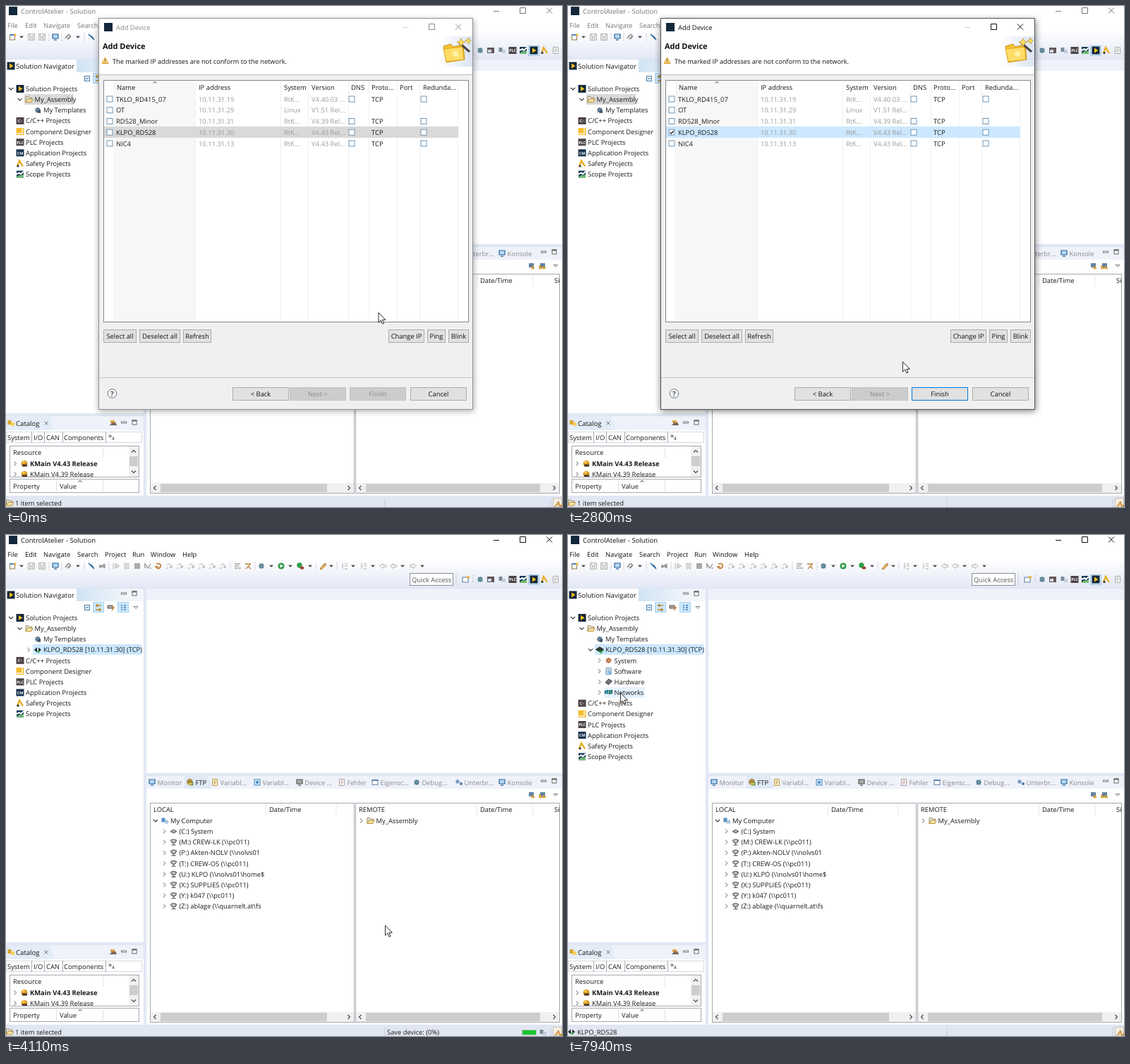
These frames come from a looping animation (788 px wide and 711 px high, 8 s). An HTML page:

```html
<!DOCTYPE html>
<html lang="en">
<head>
<meta charset="utf-8">
<title>Add device</title>
<style>
html, body { margin: 0; width: 100%; height: 100%; overflow: hidden; background: #fff; }
svg { display: block; width: 788px; height: 711px; }
text { font-family: "Open Sans", "Noto Sans", sans-serif; white-space: pre; text-rendering: geometricPrecision; }
</style>
</head>
<body>
<svg viewBox="0 0 788 711">
  <defs>
    <linearGradient id="bar" x2="0" y2="1"><stop stop-color="#fff"/><stop offset="1" stop-color="#e3e8f5"/></linearGradient>
    <linearGradient id="tab"><stop stop-color="#cfe4f3"/><stop offset=".75" stop-color="#f2f5fb"/></linearGradient>
    <linearGradient id="banner"><stop stop-color="#fff"/><stop offset="1" stop-color="#dbe4f3"/></linearGradient>
    <filter id="blur" x="-10%" y="-10%" width="120%" height="120%"><feGaussianBlur stdDeviation="5"/></filter>
  </defs>
  <g id="scene"></g>
  <path id="cursor" d="M0 0V14.2l3.2-3.1 2.3 5 2.1-.9-2.2-4.8h4.5z" fill="#fff" stroke="#111" stroke-width=".9"/>
</svg>
<script>
const LOOP = 8000;
const DEVICE = 'KLPO_RD528', PROJECT = 'My_Assembly', APP = 'ControlAtelier';
const GREY = '#9a9a9a', SELECTED = '#cce8ff', PANEL_EDGE = '#dce3f1', BOX_EDGE = '#a3a8b2';

const rect = (x, y, w, h, fill, stroke) => stroke
  ? `<rect x="${x + .5}" y="${y + .5}" width="${w - 1}" height="${h - 1}" fill="${fill}" stroke="${stroke}"/>`
  : `<rect x="${x}" y="${y}" width="${w}" height="${h}" fill="${fill}"/>`;
const text = (x, y, label, fill = '#1a1a1a', size = 9.4, extra = '') =>
  `<text x="${x}" y="${y}" fill="${fill}" font-size="${size}" ${extra}>${label}</text>`;
const path = (d, stroke, fill = 'none', width = 1) =>
  `<path d="${d}" stroke="${stroke}" fill="${fill}" stroke-width="${width}"/>`;
const disc = (x, y, r, fill, stroke = 'none') => `<circle cx="${x}" cy="${y}" r="${r}" fill="${fill}" stroke="${stroke}"/>`;
const place = (x, y, content, turn = 0) => `<g transform="translate(${x} ${y}) rotate(${turn})">${content}</g>`;
const chevron = (x, y, turn, color = '#555', s = 1) =>
  place(x, y, path(`M${-1.5 * s} ${-3 * s}L${1.5 * s} 0L${-1.5 * s} ${3 * s}`, color, 'none', 1.1), turn);

// Icons are centred on the origin and about ten pixels wide.
const tag = (fill, label) => rect(-5.5, -5, 11, 10, fill) +
  text(0, 2.3, label, '#fff', 5.4, 'text-anchor="middle" font-weight="bold"');
const screen = (fill, stroke) => path('M-4-4H4V2H-4zM-2 4.2H2', stroke, fill, 1.2);
const doc = (color, fill = '#fff') => path('M-3.5-4.5H3.5V4.5H-3.5z', color, fill) + path('M-2-2H2M-2 0H2M-2 2H1', color);
const arrow = color => path('M-4.5 0 0-3.5V-1.3H4.5V1.3H0V3.5z', color, '#fff', .9);
const folder = path('M-4.5 4V-4H-1L0-2.5H4V0', '#a98a4a', '#dbeafa') + path('M-4.5 4-2.5-.5H5.5L3.5 4z', '#b28f3c', '#fbe3a0');
const gear = (color, fill) => path('M-4 0H4M0-4V4M-3-3 3 3M3-3-3 3', color, 'none', 1.2) + disc(0, 0, 2.2, fill, color);
const cylinder = color => path('M-4-2.5Q0-5 4-2.5Q3 1 0 1Q-3 1-4-2.5M0 1V4M-3 4H3', color, '#ccc', 1.3);
const pair = (a, b) => rect(-4.5, -4, 5, 6, a) + rect(0, -1, 5, 5, b);
const icons = {
  folder, cylinder: cylinder('#666'), drive: path('M-4.5 0 0-2.5 4.5 0 0 2.5z', '#555', '#aaa'),
  play: rect(-5.5, -5.5, 11, 11, '#14283c') + path('M-2-3.5 3.5 0-2 3.5z', 'none', '#f5c01c'),
  cpp: tag('#4d4348', 'C··'), plc: tag('#4a4347', 'PLC'), cm: tag('#18324b', 'CM'),
  component: rect(-5.5, -5, 11, 10, '#f4bd2c') + path('M-5 3H3V-4', '#fff', 'none', 1.3),
  safety: path('M-4 4-1-4 4 4', '#e8aa18', 'none', 2.2) + disc(-3, 3.5, 1.6, '#333'),
  scope: rect(-5, -5, 10, 10, '#173a55') + path('M-5 0-1-2 1 0 5-4', '#fff', 'none', 2) + path('M-5 4-1 1 1 2 5 0V5H-5z', 'none', '#72bd72'),
  template: gear('#33495c', '#6ba4d8') + rect(0, 0, 4, 4, '#456'),
  link: path('M-5 0-1-3.5V3.5z', 'none', '#222') + path('M1-3.5 5 0 1 3.5z', 'none', '#333') + rect(-.5, 1, 3, 3, '#38a852'),
  online: path('M-5.5-.5 0-4 5.5-.5 0 3z', '#222', '#343d39') + path('M-1 2 1.5 4.5 5.5 0', '#35b34a', 'none', 1.7),
  system: gear('#a64b26', '#e2a35b'), software: doc('#5b87ad') + disc(2, 2, 2.2, '#7eb4df'),
  hardware: path('M-4.5 1 0-4 5-1 0 4z', '#444', '#74747c'),
  network: path('M-5 2V-2L-1-3V2M1 2V-3H5V1z', '#26735b', '#3e99c5', 1.3),
  computer: pair('#5a8fc5', '#aac7e3'), release: disc(0, 0, 4.5, '#d79920') + rect(-3, 1, 7, 3, '#4a3b36') + disc(-1, -2, 1.8, '#f8d257'),
  catalog: pair('#d8a42c', '#f8cf60'),
  new: rect(-4, -3.5, 8, 8, '#fff', '#8a7445') + rect(-4, -4, 8, 2, '#5b83b7') + disc(4, -3, 1.7, '#f3bc2e'),
  disk: path('M-4.5-4.5H4.5V4.5H-4.5zM-2.5-4V-1H2.5V-4M-2 4.5V1H2V4.5', '#b6b6b6', '#eee'),
  caret: path('M-3-1.3H3L0 1.8z', 'none', '#444'), triangle: path('M-3-1.5H3L0 1.5z', '#666', '#fff', .8),
  monitor: screen('#b8d9f5', '#29639c'), greyscreen: screen('#aaa', '#555'),
  chain: path('M-4 2 0-3Q3-4 3-1L-1 3M0 3 4-1', '#888', 'none', 1.5),
  probe: path('M-4-4 4 4M-1-2 3 2', '#326ba2', 'none', 1.7), step: path('M4-3-1 0 4 3zM-4-1H-1V2H-4', '#888', '#aaa'),
  resume: path('M-4-4V4M-1-3.5 4.5 0-1 3.5z', '#b2b2b2', '#ddd'), pause: path('M-3-4H-1V4H-3zM1-4H3V4H1z', '#bbb'),
  stop: rect(-4, -4, 8, 8, '#aaa'), hook: path('M-4 3H-1M-3-1Q0-5 3-1V2M1 0 3 3 5 0', '#aaa'),
  zig: path('M-4 3V-3L0 3 4-3M2 3H5', '#888', 'none', 1.2), restart: path('M-3-3Q4-5 3 1Q0 6-4 1H0', '#c2772b', 'none', 1.7),
  list: path('M-4-3H4M-4 0H2M-4 3H0M1 3H5', '#777', 'none', 1.2), wave: path('M-4-3H4M-3 4 3-2M0 0 4 4', '#b9853d', 'none', 1.4),
  bug: gear('#376476', '#75a7b6'), run: disc(0, 0, 4.6, '#309c48') + path('M-1.5-2.5 3 0-1.5 2.5z', 'none', '#fff'),
  ext: disc(-1, -1, 3.7, '#309c48') + rect(0, 1, 5, 3.5, '#a23e32'), torch: path('M-4 4 1-2 3 0-2 5zM1-2 4-4 4 0', '#ae7132', '#f1c064'),
  mark: path('M-3-4V4M0-3H4M0 0H4M0 3 2 5 4 3', '#aaa'), back: arrow('#aaa'), next: place(0, 0, arrow('#aaa'), 180),
  open: rect(-4.5, -3.5, 9, 8, '#fff', '#5a789b') + disc(4, -3, 2, '#e8b437'), cmd: rect(-5, -4, 10, 8, '#665557') + rect(-4, -1, 5, 4, '#cbdcf0'),
  sheets: pair('#7b8c98', '#c2cfda'), scroll: doc('#a8a8a8'),
  collapse: rect(-4, -4, 8, 8, '#e9f2fa', '#4980aa') + path('M-2 0H2', '#356c99'),
  sync: path('M4-3H-3L-1-5M-3-3-1-1M-4 3H3L1 1M3 3 1 5', '#ba8528', 'none', 1.5),
  flags: path('M-5-3H2V1H-5z', '#555', '#aaa') + path('M1-2 4 0 1 4', '#d48632', 'none', 1.5),
  tree: path('M-3-3H-1M1-3H4M-3 0H-1M1 0H4M-3 3H-1M1 3H4', '#3879b0', 'none', 1.3),
  min: rect(-4, -1.5, 8, 3, '#fff', '#777'), max: rect(-3.5, -3.5, 7, 7, '#fff', '#666') + rect(-3.5, -3.5, 7, 2, '#666'),
  ftp: disc(-.5, -.5, 4.4, '#b48938') + path('M-4 0H4V4H0', '#3f8354', '#e9be4c'),
  variable: doc('#b99745', '#fff6dc'), cyan: rect(-4.5, -4.5, 9, 9, '#d7eafb', '#4185b8') + disc(0, 0, 2, '#4185b8'),
  fault: doc('#b79a9a'), props: rect(-4.5, -4, 9, 8, '#fff', '#6481ad') + rect(-4.5, -4, 9, 2, '#6481ad'),
  breaks: disc(-2, -1, 2.2, '#8bacd0', '#5a7ba7') + disc(3, 2, 2, '#4c78aa'),
  plug: rect(-4, -4, 7, 6, '#6284a5') + path('M0 0 4 3 0 4z', '#c18922', '#f4c23e'),
  plugs: rect(-3, -4, 7, 6, '#6284a5') + path('M-4-1 0 3-4 4zM1 0 5 3 1 4z', '#c18922', '#f4c23e'),
  books: rect(-4, -3, 6, 3, '#e0a344') + rect(-3, 0, 7, 3, '#8c6a55') + rect(-5, 3, 10, 1, '#555'),
  building: path('M-5 4 0-3 2 4H5V1', '#b37531', '#eeb45f'),
};
const icon = (name, x, y) => place(x, y, icons[name]);
const toolbar = (y, spec) => spec.split(',').map(s => s.split(' ')).map(([n, x]) => icon(n, x, y)).join('');
const dots = (x, y, h) => path(`M${x} ${y}v${h}`, '#969bad').replace('/>', ' stroke-dasharray="1 2"/>');

const rowY = (i, top = 117.5) => top + i * 15.15;
function treeRow(left, y, depth, open, name, label, extra = '') {
  const x = left + 12.5 * depth;
  const fold = open === null ? '' : chevron(x + 7, y, open ? 90 : 0, open ? '#333' : '#999');
  return fold + icon(name, x + 20, y) + text(x + 28, y + 3.5, label, undefined, 9.4, extra);
}

function windowButtons(x, y, minColor, color) {
  const r = 4, gap = 37.5;
  return path(`M${x - r} ${y + 1}h${2 * r}`, minColor) + path(`M${x + gap - r} ${y - r}h${2 * r}v${2 * r}h${-2 * r}z`, color) +
    path(`M${x + 2 * gap - r} ${y - r}l${2 * r} ${2 * r}m0 ${-2 * r}l${-2 * r} ${2 * r}`, color);
}

const drives = String.raw`(C:) System
(M:) CREW-LK (\\pc011)
(P:) Akten-NOLV (\\nolvs01
(T:) CREW-OS (\\pc011)
(U:) KLPO (\\nolvs01\home$
(X:) SUPPLIES (\\pc011)
(Y:) k047 (\\pc011)
(Z:) ablage (\\quarnelt.at\fs`.split('\n');

function fileBox(x, title, dateX, thumbEnd) {
  const right = x + 290;
  return rect(x, 380, 290, 312, '#fff', BOX_EDGE) + text(x + 5, 393, title) + text(dateX, 393, 'Date/Time') +
    path(`M${dateX - 4.5} 382v16M${dateX + 95 - (x > 400 ? 20 : 0)} 382v16`, '#e8e8e8') +
    rect(x + 1, 677, 288, 14, '#f0f0f0') + rect(x + 15, 678, thumbEnd - x - 15, 12, '#cdcdcd') +
    chevron(x + 7, 684, 180, '#444') + chevron(right - 8, 684, 0, '#444');
}

const frame = rect(0, 0, 788, 711, '#e4e9f6') + rect(0, 0, 788, 36, '#fff') + rect(0, 35, 788, 40, 'url(#bar)') +
  rect(4, 1, 12, 12, '#14283c') +
  toolbar(44, 'new 9,caret 22,disk 36,disk 51,monitor 70,chain 88,caret 102,probe 121,step 136,resume 156,pause 171,stop 186,zig 201,restart 216,hook 231,hook 246,hook 262,hook 277,hook 292,hook 307,list 328,wave 343,bug 362,caret 376,run 390,caret 403,ext 417,caret 431,torch 449,caret 461,mark 480,caret 492,mark 507,caret 520,back 534,back 549,caret 562,next 577,caret 590') +
  [61, 79, 111, 146, 318, 353, 439, 469].map(x => dots(x, 39, 10)).join('') +
  rect(572, 54, 62, 18, '#fff', '#8c909a') + text(575, 66.5, 'Quick Access', '#555') + dots(638, 55, 16) + dots(662, 57, 12) +
  rect(740, 56, 16, 15, '#cce4f7', '#a8cce8') +
  toolbar(63, 'open 651,bug 672,cmd 687,sheets 703,plc 718,scope 733,play 748,safety 763,scroll 779') +
  // Left panels
  rect(-1, 75, 197, 504, '#fff', PANEL_EDGE) + rect(100, 76, 95, 18, 'url(#tab)') +
  icon('play', 7, 85) + text(14, 88.7, 'Solution Navigator', undefined, 9.6) + toolbar(83, 'min 167,max 182,min 762,max 777') +
  rect(123, 95, 16, 15, SELECTED, '#a7d2ef') + rect(158, 95, 16, 15, SELECTED, '#a7d2ef') +
  toolbar(103, 'collapse 115,sync 131,flags 149,tree 166,triangle 184') +
  rect(-1, 581, 197, 115, '#fff', PANEL_EDGE) + rect(0, 582, 195, 20, '#eff2fa') +
  path('M0 602V582H60Q65 582 67 602z', 'none', '#e3ecf7') + icon('catalog', 7, 592) + text(14, 596.3, 'Catalog', undefined, 9.6) +
  path('M54.5 589.5l5 5m0-5l-5 5', '#777') + toolbar(591, 'books 152,min 167,max 182') +
  rect(0, 604, 193, 16, '#fff', '#d5d8df') + path('M36.5 604v16M54.5 604v16M80.5 604v16M141.5 604v16', '#a6abb5') +
  text(2, 615.5, 'System') + text(39, 615.5, 'I/O') + text(57, 615.5, 'CAN') + text(82, 615.5, 'Components') +
  text(145, 613, '»', undefined, 10) + text(150, 616, '4', undefined, 6.5) +
  rect(5, 624, 184, 45, '#fff', BOX_EDGE) + text(10, 637, 'Resource') + path('M137.5 626v15', '#e5e5e5') +
  treeRow(6, 649.5, 0, false, 'release', 'KMain V4.43 Release', 'font-weight="bold"') +
  treeRow(6, 664.5, 0, false, 'release', 'KMain V4.39 Release') +
  rect(0, 668, 194, 4, '#fff') + path('M5 668.5h184', BOX_EDGE) +
  rect(174, 625, 14, 43, '#f0f0f0') + rect(175, 639, 12, 14, '#cdcdcd') + chevron(181, 632, 270, '#444') + chevron(181, 661, 90, '#444') +
  rect(5, 671, 184, 20, '#fff', BOX_EDGE) + text(10, 685, 'Property') + text(76, 685, 'Value') +
  path('M71.5 673v16M137.5 673v16', '#e0e0e0') + chevron(105, 674.5, 270, '#777', .8) +
  // Editor and file panels
  rect(198, 75, 591, 264, '#fff', PANEL_EDGE) + rect(199, 76, 589, 16, '#eff2fa') +
  rect(198, 341, 591, 355, '#fff', PANEL_EDGE) + rect(199, 342, 589, 18, '#eff2fa') +
  path('M253 360V345Q253 341 257 341H284Q289 342 291 360z', 'none', '#e0eaf6') +
  [['monitor', 207, 'Monitor'], ['ftp', 261, 'FTP'], ['variable', 296, 'Variabl...'], ['cyan', 356, 'Variabl...'], ['greyscreen', 416, 'Device ...'],
    ['fault', 476, 'Fehler'], ['props', 523, 'Eigensc...'], ['bug', 582, 'Debug...'], ['breaks', 642, 'Unterbr...'], ['monitor', 703, 'Konsole']]
    .map(([n, x, s]) => icon(n, x, 351) + text(x + 7.5, 354.7, s, s === 'FTP' ? '#111' : '#8b8b8b')).join('') +
  toolbar(349, 'min 762,max 777') + toolbar(369, 'plug 745,plugs 760,triangle 779') +
  fileBox(204, 'LOCAL', 373, 455) + fileBox(495, 'REMOTE', 672, 757) + text(777, 393, 'Si') +
  treeRow(205, 405.5, 0, true, 'computer', 'My Computer') +
  drives.map((s, i) => treeRow(205, rowY(i + 1, 405.5), 1, false, i ? 'cylinder' : 'drive', s)).join('') +
  treeRow(496.5, 405.5, 0, false, 'folder', PROJECT) +
  // Status bar
  rect(0, 697, 788, 14, '#e1e6f3') + dots(537, 700, 11) + dots(772, 700, 11) + rect(775, 698, 13, 13, '#f5efe1', '#c7c3b5') + icon('building', 783, 706);

function navigator(s) {
  const devices = s.saved ? [[2, s.expanded, s.online ? 'online' : 'link', DEVICE + ' [10.11.31.30] (TCP)']] : [];
  const parts = s.expanded ? [['system', 'System'], ['software', 'Software'], ['hardware', 'Hardware'], ['network', 'Networks']] : [];
  const rows = [[0, true, 'play', 'Solution Projects'], [1, true, 'folder', PROJECT], [2, null, 'template', 'My Templates'],
    ...devices, ...parts.map(([n, label]) => [3, false, n, label]),
    ...[['cpp', 'C/C++ Projects'], ['component', 'Component Designer'], ['plc', 'PLC Projects'], ['cm', 'Application Projects'],
      ['safety', 'Safety Projects'], ['scope', 'Scope Projects']].map(([n, label]) => [0, null, n, label])];
  return (s.saved ? rect(38, 155, 154, 15, SELECTED) : rect(26, 125, 70, 15, '#d9d9d9')) +
    rows.map(([depth, open, n, label], i) =>
      (s.part === i && depth === 3 ? rect(51, rowY(i) - 7.5, 18 + label.length * 5, 15, '#e5f3ff') : '') +
      treeRow(0, rowY(i), depth, open, n, label)).join('');
}

function button(x, y, w, label, mode = 'normal', h = 19) {
  const [fill, edge, ink] = { normal: ['#e1e1e1', '#adadad', '#111'], off: ['#ccc', '#bfbfbf', '#8a8a8a'],
    primary: ['#e1e1e1', '#0078d7', '#111'], hover: ['#e5f1fb', '#0078d7', '#111'] }[mode];
  return rect(x, y, w, h, fill, edge) + text(x + w / 2, y + h / 2 + 3.6, label, ink, 9.4, 'text-anchor="middle"');
}
const checkbox = (x, y, on) => rect(x - 4.5, y - 4.5, 9, 9, '#fff', '#6f95b5') +
  (on ? path(`M${x - 2.5} ${y}l2 2 3.3-4`, '#222', 'none', 1.2) : '');

const columns = [157, 273, 394, 433, 489, 518, 558, 591];
const headings = ['Name', 'IP address', 'System', 'Version', 'DNS', 'Proto...', 'Port', 'Redunda...'];
const found = [['TKLO_RD415_07', 19, 'RtK...', 'V4.40.03 ...'], ['OT', 29, 'Linux', 'V1.51 Rel...'], ['RD528_Minor', 31, 'RtK...', 'V4.39 Rel...'],
  [DEVICE, 30, 'RtK...', 'V4.43 Rel...'], ['NIC4', 13, 'RtK...', 'V4.43 Rel...']];

function dialog(s) {
  const ink = s.active ? '#111' : '#8a8a8a';
  const rows = found.map(([name, host, system, version], i) => {
    const y = 132 + i * 15.75;
    return checkbox(147, y, i === 3 && s.checked) + text(156, y + 3.5, name) +
      ['10.11.31.' + host, system, version].map((v, c) => text(columns[c + 1], y + 3.5, v, GREY)).join('') +
      (i === 1 ? '' : checkbox(490, y) + text(518, y + 3.5, 'TCP') + checkbox(592, y));
  }).join('');
  const finish = s.closing || !s.checked ? 'off' : s.finishHover ? 'hover' : 'primary';
  const plain = s.closing ? 'off' : 'normal';
  return `<rect x="131" y="20" width="532" height="555" opacity="${s.active ? .5 : .32}" filter="url(#blur)"/>` +
    rect(131, 17, 531, 556, '#f0f0f0', s.active ? '#555' : '#8f8f8f') + rect(132, 18, 529, 79, '#fff') + path('M132 97.5H661', '#bdbdbd') +
    rect(139, 24, 12, 12, '#14283c') + text(156, 33.5, 'Add Device', ink) + windowButtons(566, 29.5, '#ccc', ink) +
    text(137, 61.3, 'Add Device', '#111', 11, 'font-weight="bold"') +
    path('M140.5 73 145 81.5H136z', '#d99a25', '#ffd67a') + path('M140.5 75.5v3m0 1v1', '#553') +
    text(151, 81.6, 'The marked IP addresses are not conform to the network.', '#111', 9.2) +
    rect(614, 43, 47, 43, 'url(#banner)') + path('M620 57 631 54 633 58 648 55 650 76 624 80z', '#c99012', '#f5c330') +
    path('M620 61 647 58 649 76 624 79z', '#e0a91c', '#ffdc68') + disc(637, 68, 4, '#fff2a8') + path('M642 52 657 65', '#4b4543', 'none', 3) +
    path('M639 51l4-1 2-4 2 4 4 1-4 2-1 4-3-3zM651 49l3-1 1-3 2 3 2 1-2 2-1 3-2-3z', '#bb8a23', '#ffdf62', .7) +
    // Device table
    rect(138, 105, 518, 344, '#fff', '#828790') + rect(152, 106, 116, 342, '#f7f7f7') +
    path([268, 389, 428, 485, 514, 554, 586, 640].map(x => `M${x + .5} 107V448`).join(''), '#f0f0f0') + chevron(211, 108.5, 270, '#888', .8) +
    headings.map((h, i) => text(columns[i], 118.8, h)).join('') +
    (s.rowHover ? rect(139, 171, 502, 16, SELECTED, '#99d1ff') : rect(139, 171, 502, 16, s.active ? SELECTED : '#d9d9d9')) + rows +
    [[138, 47, 'Select all'], [189, 58, 'Deselect all'], [251, 40, 'Refresh'], [542, 51, 'Change IP'], [597, 26, 'Ping'], [627, 29, 'Blink']]
      .map(([x, w, label]) => button(x, 459, w, label, plain)).join('') +
    path('M132 527.5H661', '#c8c8c8') + disc(150.5, 550, 6.3, '#f5f5f5', '#6d7684') +
    text(150.5, 553.7, '?', '#4d5968', 10, 'text-anchor="middle" font-weight="bold"') +
    button(321, 541, 80, '&lt; Back', plain) + button(402, 541, 80, 'Next >', 'off') + button(487, 541, 80, 'Finish', finish) + button(573, 541, 80, 'Cancel', plain);
}

function draw(s) {
  const titleInk = s.open ? '#777' : '#111', menuInk = s.closing ? '#111' : '#777';
  const menus = [[2, 'File'], [27, 'Edit'], [53, 'Navigate'], [101, 'Search'], [140, 'Project'], [179, 'Run'], [205, 'Window'], [250, 'Help']];
  return frame + text(21, 10.5, APP + ' - Solution', titleInk, 9.5) + windowButtons(695, 6.5, titleInk, titleInk) +
    menus.map(([x, label]) => text(x, 31.3, label, menuInk)).join('') + navigator(s) +
    icon(s.named ? 'link' : 'folder', 5, 705) + text(13, 708.5, s.named ? DEVICE : '1 item selected') +
    (s.saving ? text(540, 709, 'Save device: (0%)') + rect(731, 702, 21, 8, '#17c52f', '#b5c2b5') + icon('sheets', 761, 706) : '') +
    (s.open ? dialog(s) : '');
}

// Pointer path: time, x, y
const stops = [[0, 528, 435], [80, 528, 435], [230, 534, 456], [780, 190, 179], [940, 190, 179], [1490, 168, 180], [1640, 168, 180],
  [1870, 146, 181], [2100, 145, 181], [2250, 141, 179], [2450, 145, 181], [2870, 500, 530], [2950, 500, 530], [3250, 541, 560],
  [3570, 537.5, 554], [4180, 537.5, 554], [4880, 217, 197], [4980, 217, 197], [5140, 47.5, 170], [5600, 30, 162], [5830, 29.5, 161.5],
  [6700, 29.5, 161.5], [7160, 88, 171], [7560, 88, 171], [7800, 72, 221], [7940, 74.5, 224], [LOOP, 74.5, 224]];
function pointer(t) {
  const i = stops.findIndex(p => p[0] > t), [t0, x0, y0] = stops[i - 1], [t1, x1, y1] = stops[i];
  const k = (t - t0) / (t1 - t0), e = k * k * (3 - 2 * k);
  return [x0 + (x1 - x0) * e, y0 + (y1 - y0) * e];
}

const scene = document.getElementById('scene'), cursor = document.getElementById('cursor');
let shown = '';
function tick() {
  const t = performance.now() % LOOP, [x, y] = pointer(t);
  const inside = (l, top, r, b) => x >= l && x < r && y >= top && y < b;
  const expanded = t >= 6230;
  const state = {
    open: t < 3810, closing: t >= 3730, active: t >= 940, checked: t >= 2330, saved: t >= 4110, saving: t >= 3960 && t < 4850,
    named: t >= 4400, expanded, online: t >= 6850,
    rowHover: t < 3810 && inside(139, 171, 641, 187), finishHover: inside(487, 541, 567, 560),
    part: expanded && x > 51 ? Math.round((y - 117.5) / 15.15) : -1,
  };
  const key = JSON.stringify(state);
  if (key !== shown) { scene.innerHTML = draw(state); shown = key; }
  cursor.setAttribute('transform', `translate(${x} ${y})`);
  requestAnimationFrame(tick);
}
tick();
</script>
</body>
</html>
```
